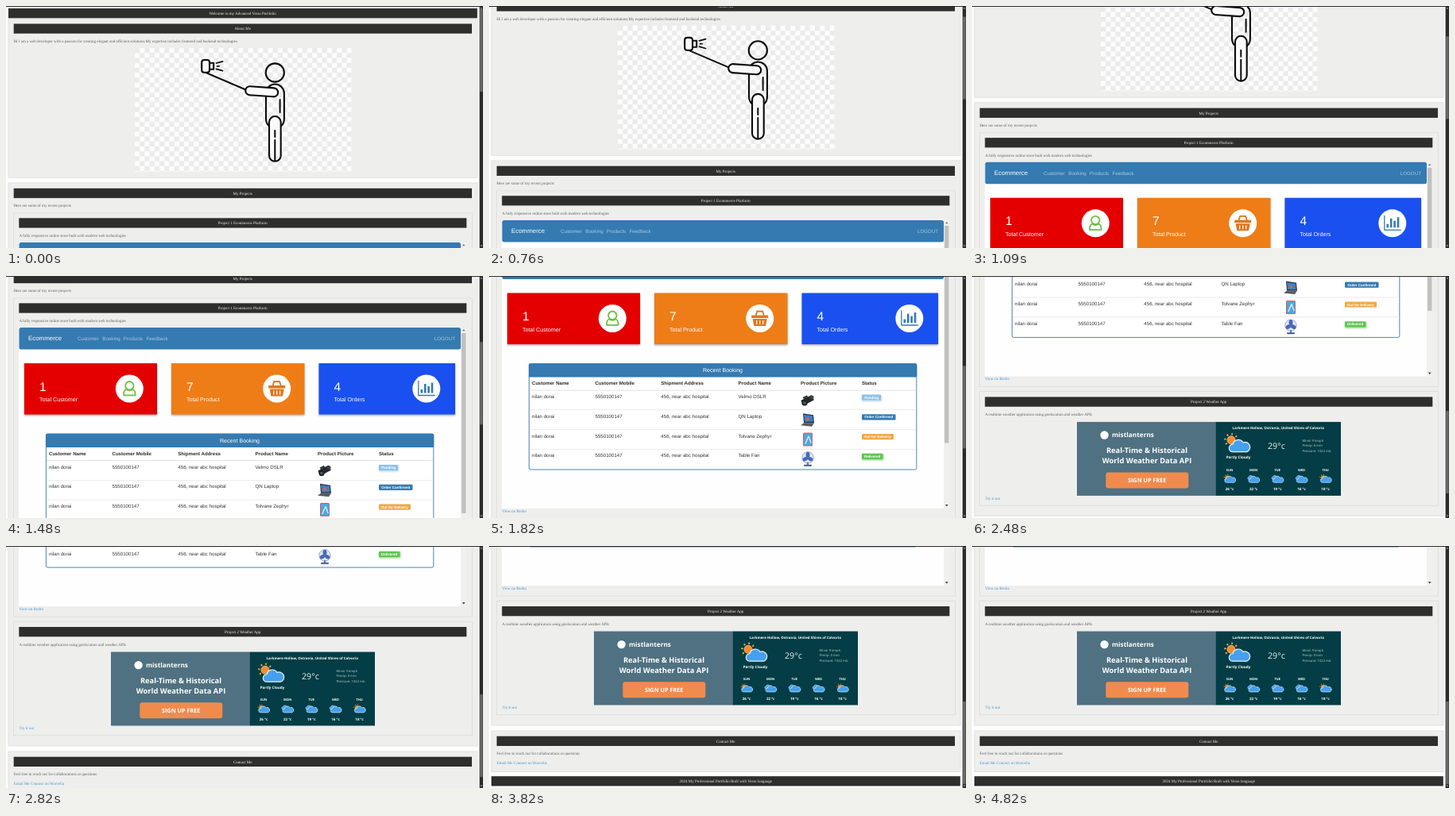
An HTML page for the animation above (5.06 s loop, 600x305 px).

```html
<!DOCTYPE html>
<html lang="en">
<head>
<meta charset="utf-8">
<title>Portfolio scroll</title>
<style>
html, body { margin: 0; width: 100%; height: 100%; overflow: hidden; background: #fdfdfd; }
svg { display: block; width: 100vw; height: 100vh; }
text { text-rendering: geometricPrecision; white-space: pre; }
.serif { font-family: "Liberation Serif", "Times New Roman", serif; font-size: 5px; }
.sans { font-family: "Liberation Sans", Arial, sans-serif; }
.open { font-family: "Open Sans", "Noto Sans", sans-serif; }
</style>
</head>
<body>
<svg id="stage" viewBox="0 0 600 305" preserveAspectRatio="none" xmlns="http://www.w3.org/2000/svg">
  <defs>
    <pattern id="check" x="162" y="53" width="12.4" height="12.4" patternUnits="userSpaceOnUse">
      <path d="M0 0H12.4V12.4H0Z" fill="#fcfcfc"/>
      <path d="M0 0H6.2V6.2H0ZM6.2 6.2H12.4V12.4H6.2Z" fill="#ebebeb"/>
    </pattern>
    <filter id="soft" x="-10%" y="-10%" width="120%" height="130%"><feGaussianBlur stdDeviation="1.3"/></filter>
    <g id="cloud">
      <path d="M-7 5a4 4 0 0 1 0-8a6 6 0 0 1 11-2a4.6 4.6 0 0 1 4 10Z" fill="#45a0ee" stroke="#e8f4fb" stroke-width="1"/>
    </g>
    <g id="sun">
      <circle r="7.6" fill="none" stroke="#f6a23c" stroke-width="2.4" stroke-dasharray="1.8 4.17"/>
      <circle r="5" fill="#f58a2c" stroke="#fbd9a0" stroke-width=".7"/>
    </g>
  </defs>
  <g id="page"></g>
  <g id="bar"></g>
</svg>
<script>
const LOOP = 5060, VIEW = 305, MAX = 564.5;
const BLUE = '#357ab1', LINK = '#3f97d3', INK = '#5c5c5c';

const rect = (x, y, r, b, fill, extra = '') =>
  `<rect x="${x}" y="${y}" width="${r - x}" height="${b - y}" fill="${fill}" ${extra}/>`;
const text = (cls, x, y, s, fill, extra = '') =>
  `<text class="${cls}" x="${x}" y="${y}" fill="${fill}" ${extra}>${s}</text>`;
const path = (d, color, w, extra = '') =>
  `<path d="${d}" fill="none" stroke="${color}" stroke-width="${w}" stroke-linecap="round" stroke-linejoin="round" ${extra}/>`;
const circle = (x, y, r, fill, extra = '') => `<circle cx="${x}" cy="${y}" r="${r}" fill="${fill}" ${extra}/>`;
const use = (id, x, y, k = 1) => `<use href="#${id}" transform="translate(${x} ${y}) scale(${k})"/>`;
const serif = (x, y, s, fill = INK) => text('serif', x, y, s, fill);
const sans = (x, y, size, s, fill, extra = '') => text('sans', x, y, s, fill, `font-size="${size}" ${extra}`);
const open = (x, y, size, s, fill = '#fff', extra = 'text-anchor="middle" font-weight="700"') =>
  text('open', x, y, s, fill, `font-size="${size}" ${extra}`);
const panel = (x, y, r, b) => rect(x, y, r, b, '#eeeeec', 'stroke="#d9d9d7" stroke-width=".7"');
const heading = (x, y, r, s) => rect(x, y, r, y + 12.3, '#2e2e2d') +
  text('serif', 297.7, y + 8, s, '#f2f2f0', 'text-anchor="middle"');

function selfie() {
  const K = '#0b0b0b', shape = `fill="#fafafa" stroke="${K}" stroke-width="2.1"`;
  return rect(162, 53, 434.5, 209, 'url(#check)') +
    `<circle cx="338.3" cy="84" r="11.6" fill="none" stroke="${K}" stroke-width="2.1"/>` +
    path('M331 151.5Q327 148 327 142V110a11.4 11.4 0 0 1 22.9 0V142Q350 148 346 151.5', K, 2.1) +
    path('M344.6 118V134', K, 2) +
    `<rect x="331" y="139" width="14.7" height="56.8" rx="7.3" ${shape}/>` +
    path('M338.3 157V165M338.3 169V195', K, 2) +
    path('M301.5 105.5L251.5 84', K, 2) +
    `<rect x="301.2" y="102.3" width="41" height="11" rx="5.5" transform="rotate(4 322 108)" ${shape}/>` +
    `<rect x="246.2" y="68" width="9.8" height="15.8" rx="3" ${shape}/>` +
    path('M256.3 71.8H261.2V79.8H256.3', K, 2) +
    path('M264.5 72L272.5 69.8M265.5 75.8H268M264.5 79.3L272.5 81.6', K, 1.8);
}

function tile(x, r, color, n, label, cx, icon) {
  return rect(x, 344, r, 409, '#8a8a8a', 'filter="url(#soft)" opacity=".7"') +
    rect(x, 343, r, 407.5, color) +
    sans(x + 19, 377.6, 15.5, n, '#fff') + sans(x + 19, 391.2, 7.15, label, '#fff') +
    circle(cx, 375, 17.5, '#fff') + `<g transform="translate(${cx} 375)">${icon}</g>`;
}

const person = path('M-7.2 8.3Q-7.8 2.2-4 .8Q0 4 4 .8Q7.8 2.2 7.2 8.3Z', '#6cbf3f', 1.8) +
  `<circle cy="-3.8" r="5.2" fill="none" stroke="#6cbf3f" stroke-width="1.8"/>`;
const basket = path('M-5.5-2L-3.5-9H3.5L5.5-2', '#df761c', 1.8) +
  `<path d="M-10.5-4H10.5V-.5H-10.5ZM-9 .5H9L7.3 9.5H-7.3Z" fill="#df761c"/>` +
  path('M-4 3V7M0 3V7M4 3V7', '#fff', 1.3);
const chart = path('M-10-9.5V8.5H10.5', BLUE, 1.3) +
  path('M-6 5.5V1M-1.6 5.5V-6M2.8 5.5V-3M7.2 5.5V-7.5', BLUE, 2.6, 'style="stroke-linecap:butt"');

const goods = [
  `<g transform="rotate(-28)">${rect(-8, -3.5, 7, 3.5, '#24282b')}${rect(-4, -6, 2, -3, '#34393c')}</g>` +
    circle(-4, 3.5, 3.6, '#1d2123') + circle(-4, 3.5, 1.7, '#536169') + circle(5, -3.5, 2.5, '#3b4247'),
  `<path d="M-6-8L7-6L8 4L-5 4Z" fill="#263344"/><path d="M-5-6.5L6-5L6.6 2.5L-4 2.5Z" fill="#3e7fc4"/>` +
    `<path d="M-5 4L8 4L5 8.5L-9 7Z" fill="#595b62"/>` + circle(0, -1, 2.2, '#c66a4c'),
  rect(-6, -8.5, 6, 8.5, '#d95b56', 'rx="1.5"') + rect(-4.8, -7.5, 5.3, 7.7, '#4aa8e2', 'rx="1"') +
    path('M-3 5L1-4L4 4', '#cfeaf6', 1.5),
  circle(0, -2, 7.2, '#e3e9f5', 'stroke="#7f92c5" stroke-width=".8"') +
    [0, 120, 240].map(a => `<ellipse cy="-3.6" rx="2.5" ry="3.5" fill="#4868b8" transform="translate(0 -2) rotate(${a})"/>`).join('') +
    rect(-1, 4, 1, 8, '#6079b5') + rect(-5, 7, 5, 9, '#3d559e', 'rx="1"')
];

function bookings() {
  const cols = [54, 133.5, 216.3, 313.5, 392, 469];
  const titles = ['Customer Name', 'Customer Mobile', 'Shipment Address', 'Product Name', 'Product Picture', 'Status'];
  const rows = [
    ['Velmo DSLR', 'Pending', 24, '#8fc1e6'],
    ['QN Laptop', 'Order Confirmed', 42.5, BLUE],
    ['Tolvane Zephyr', 'Out for Delivery', 40, '#eda84c'],
    ['Table Fan', 'Delivered', 26.5, '#62c455']
  ];
  let s = rect(50.4, 432, 537.8, 565.5, '#fff', `rx="2" stroke="${BLUE}" stroke-width=".9"`) +
    rect(50, 431.8, 538.2, 449, BLUE, 'rx="1.5"') +
    sans(294, 443, 7.1, 'Recent Booking', '#fff', 'text-anchor="middle"');
  titles.forEach((t, i) => s += sans(cols[i], 459, 6.1, t, '#2d2d2d', 'font-weight="700"'));
  s += rect(51, 465.2, 537.4, 466, '#dadada');
  rows.forEach(([name, state, w, color], i) => {
    const y = 475.6 + 24.8 * i;
    if (i) s += rect(51, y - 10.4, 537.4, y - 9.8, '#dedede');
    ['nilan dorai', '5550100147', '456, near abc hospital', name]
      .forEach((t, j) => s += sans(cols[j], y, 6.15, t, '#333'));
    s += `<g transform="translate(401 ${y + 2.3})">${goods[i]}</g>`;
    if (!i || i === 3) s += rect(469, y - 4, 470 + w, y + 4, color, 'filter="url(#soft)" opacity=".6"');
    s += rect(469, y - 4.7, 469 + w, y + 2.5, color, 'rx="1.2"') +
      sans(469 + w / 2, y + .6, 4.5, state, '#fff', 'text-anchor="middle" font-weight="700"');
  });
  return s;
}

function shop() {
  const links = [[90, 'Customer'], [121.3, 'Booking'], [147.8, 'Products'], [176.5, 'Feedback'], [538.8, 'LOGOUT']];
  return rect(16, 298, 579, 614.5, '#fefefe') + rect(572, 298, 579, 614.5, '#f0f0f0') +
    rect(573, 305, 578.4, 532, '#c0c0c0') +
    '<path d="M573.8 302.3L575.7 300L577.6 302.3Z" fill="#777"/><path d="M573.8 609.5L575.7 612L577.6 609.5Z" fill="#444"/>' +
    rect(16.5, 298, 572, 325.5, BLUE, 'rx="2.5"') +
    sans(28, 314.2, 7.9, 'Ecommerce', '#fff') +
    links.map(([x, t]) => sans(x, 313.9, 6.2, t, '#a9c9e1')).join('') +
    tile(23, 190, '#e50000', 1, 'Total Customer', 155.3, person) +
    tile(208, 375.5, '#ee7d18', 7, 'Total Product', 340.7, basket) +
    tile(393.5, 565, '#1a50ef', 4, 'Total Orders', 528.8, chart) +
    bookings();
}

function weather() {
  const days = [['SUN', 26], ['MON', 22], ['TUE', 19], ['WED', 16], ['THU', 18]];
  const left = 'font-weight="400"';
  let s = rect(132, 672, 307, 765, '#4f7181') + rect(306.8, 672, 464, 765, '#043d45') +
    circle(166.6, 688.6, 5.2, '#fff') +
    open(176, 691.3, 8.25, 'mistlanterns', '#fff', 'font-weight="700"') +
    open(220, 711, 9.3, 'Real-Time &amp; Historical') + open(220, 724.1, 9.35, 'World Weather Data API') +
    rect(168.3, 735.7, 272.3, 755.7, '#f18b4d', 'rx="3"') + open(220.2, 748.6, 7.3, 'SIGN UP FREE') +
    open(385.2, 681.4, 4.4, 'Larkmere Hollow, Ostrania, United Shires of Calvoria') +
    use('sun', 326, 694.8) + use('cloud', 336.3, 703.8, 1.18) +
    open(335, 718.3, 4.6, 'Partly Cloudy') + open(372, 706.6, 10.7, '29°c', '#e9f1f1', left);
  ['Wind: 9 kmph', 'Precip: 0 mm', 'Pressure: 1022 mb']
    .forEach((t, i) => s += open(415.5, 697.2 + 6.4 * i, 4.15, t, '#bed0d2', left));
  days.forEach(([d, temp], i) => {
    const x = 324 + 30.15 * i;
    s += open(x, 733.8, 4, d);
    s += i % 4 ? use('cloud', x - 3, 742.5, .4) : use('sun', x - 3, 742.3, .5);
    s += use('cloud', x + .6, 745.3, .62) + open(x, 758.4, 4.5, temp + ' °c');
  });
  return s;
}

page.innerHTML =
  rect(-5, -5, 605, 880, '#fdfdfd') +
  panel(3, 16.2, 593, 216.3) + heading(3, 3, 592.8, 'Welcome to my Advanced Verso Portfolio') +
  heading(9.7, 22.4, 586, 'About Me') +
  serif(9.5, 45.7, 'Hi I am a web developer with a passion for creating elegant and efficient solutions.My expertise includes frontend and backend technologies') +
  selfie() +
  panel(3, 223, 593, 790.5) + heading(9.7, 229.8, 586, 'My Projects') +
  serif(9.5, 253.2, 'Here are some of my recent projects') +
  panel(9.7, 261, 586.3, 627.5) + heading(16.3, 267.3, 579.3, 'Project 1 Ecommerce Platform') +
  serif(16.5, 290.8, 'A fully responsive online store built with modern web technologies') +
  shop() + serif(16.5, 619.2, 'View on Brelto', LINK) +
  panel(9.7, 633.7, 586.3, 777.3) + heading(16.3, 640.5, 579.3, 'Project 2 Weather App') +
  serif(16.5, 664, 'A realtime weather application using geolocation and weather APIs') +
  weather() + serif(16.5, 769.8, 'Try it out', LINK) +
  panel(3, 797.5, 593, 849) + heading(9.7, 804.2, 586, 'Contact Me') +
  serif(9.5, 827.6, 'Feel free to reach out for collaborations or questions') +
  serif(9.7, 839.8, 'Email Me Connect on Worvelia', LINK) +
  heading(3, 854.7, 592.8, '2024 My Professional Portfolio Built with Verso language');

bar.innerHTML = rect(595.6, 0, 600, VIEW, '#2b2b2b') + rect(596.2, 4, 599.6, 108, '#6a6a6a', 'id="thumb"') +
  '<path d="M596.6 3.6L597.9 1.8L599.2 3.6Z" fill="#aaa"/><path d="M596.6 301.6L597.9 303.4L599.2 301.6Z" fill="#aaa"/>' +
  rect(0, 0, 600, 1, '#2a2c2a');
const thumb = document.getElementById('thumb');

// start, end, from, to, amount of easing
const moves = [
  [640, 1180, 0, 117, .25],
  [1180, 1480, 117, 233, .4],
  [1580, 2030, 233, 387, .4],
  [2180, 2610, 387, 512.5, 1],
  [2730, 2940, 512.5, MAX, .5]
];
const TICK = 30;

function scrollAt(t) {
  let y = 0;
  for (const [start, end, from, to, ease] of moves) {
    if (t < start) break;
    const lead = start === 1180 ? 0 : TICK;
    const held = Math.floor((t - start) / TICK) * TICK + lead;
    const u = Math.min(1, held / (end - start + lead));
    y = from + (to - from) * (u + ease * (u * u * (3 - 2 * u) - u));
  }
  return y;
}

function draw(now) {
  const y = scrollAt(now % LOOP);
  page.setAttribute('transform', `translate(0 ${-y})`);
  thumb.setAttribute('y', 4 + y / MAX * 192);
  requestAnimationFrame(draw);
}
const page0 = performance.now();
draw(0);
</script>
</body>
</html>
```
